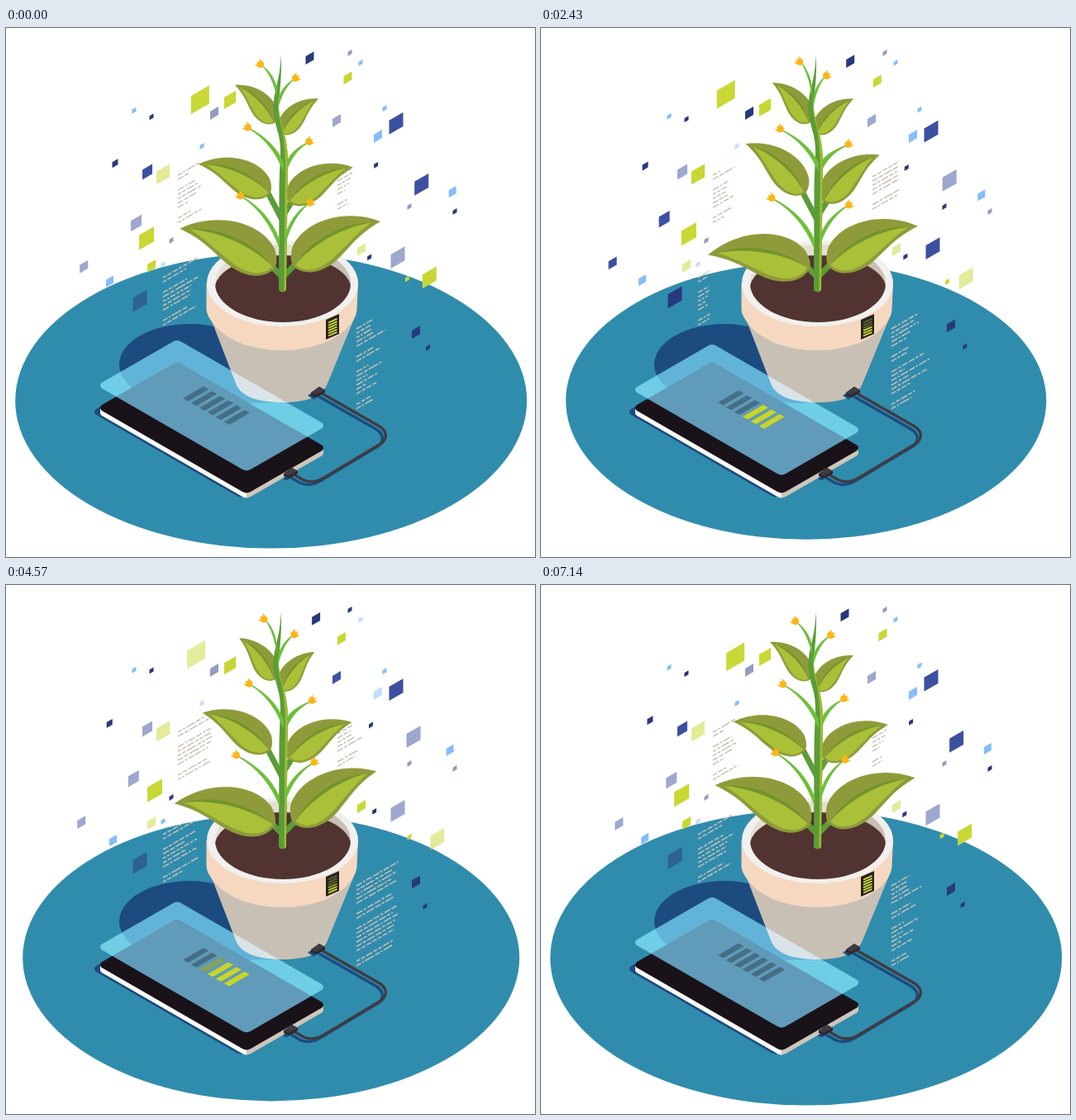
An HTML page with a canvas that plays this animation: 640 px wide and 640 px high, repeating every 7.21 s.

```html
<!DOCTYPE html>
<html lang="en">
<head>
<meta charset="utf-8">
<title>Plant power</title>
<style>
html, body { margin: 0; width: 100%; height: 100%; overflow: hidden; background: #fff; }
canvas { display: block; width: 100vw; height: 100vh; }
</style>
</head>
<body>
<canvas id="stage" width="640" height="640"></canvas>
<script>
const g = document.getElementById('stage').getContext('2d');
const LOOP = 7210;
const ISO = 0.577;
const TEAL = '#308cad', NAVY = '#1c4b80', INK = '#27397c', BLUE = '#3c50a0';
const SKY = '#84bdfb', LIME = '#c8d733', STONE = '#c9c0b5', GREEN = '#5b9c36';

// Sine wave over the loop that reaches 1 at the given time
const wave = (t, peak) => Math.cos((t - peak) / LOOP * Math.PI * 2);
const clamp = v => Math.max(0, Math.min(1, v));
const rad = deg => deg * Math.PI / 180;
const mix = (a, b, k) => a + (b - a) * k;

function fill(path, color) {
  g.fillStyle = color;
  g.fill(new Path2D(path));
}

function oval(x, y, rx, ry, color) {
  g.fillStyle = color;
  g.beginPath();
  g.ellipse(x, y, rx, ry, 0, 0, Math.PI * 2);
  g.fill();
}

function splitFill(x, left, right) {
  const s = g.createLinearGradient(x - 0.5, 0, x + 0.5, 0);
  s.addColorStop(0, left);
  s.addColorStop(1, right);
  return s;
}

function ground(t) {
  const u = clamp(t / 6210);
  const r = 309.5 - 22.5 * Math.abs(Math.sin(u * Math.PI)) ** 3;
  oval(320.7, 451, r, r * ISO, TEAL);
  oval(222, 407, 85, 49, NAVY);
  fill('M232 358 L300 380 L335 453 L225 455Z', NAVY);
}

// Three flashes take turns in each half loop; the fourth kind dips with the second
function flash(t, kind) {
  if (!kind) return 1;
  if (kind === 4) return 1.48 - flash(t, 2);
  const half = LOOP / 2;
  let d = Math.abs(t % half - (kind - 1) * half / 3);
  d = Math.min(d, half - d);
  return 0.5 + 0.5 * clamp(Math.cos(Math.PI * d / 1500) * 1.1);
}

// Still bits by kind of flash: colour, x, y, width
const still = [
  [],
  [[BLUE, 171, 174, 12], [LIME, 176, 288, 10], [SKY, 237, 143, 5], [INK, 543, 222, 5]],
  [[BLUE, 400, 112, 10], [LIME, 430, 268, 10], [SKY, 190, 286, 5], [INK, 200, 257, 5], [INK, 416, 30, 5]],
  [[INK, 252, 103, 10], [LIME, 190, 177, 16], [INK, 488, 216, 5]],
  [[SKY, 450, 131, 10], [SKY, 429, 42, 5]]
];

// Drifting bits share a peak time; wide ones may flash.
// Each has a colour, centre, width and one of six isometric ways
const drifts = [
  { peak: 3650, kind: 0, bits: [
    [LIME, 271, 93, 14, 1], [LIME, 176, 251, 18, 5], [LIME, 409, 63, 10, 2], [BLUE, 472, 122, 17, 1],
    [INK, 128, 166, 7, 2], [INK, 372, 39, 10, 0], [INK, 444, 168, 5, 2], [INK, 496, 363, 10, 4]] },
  { peak: 3650, kind: 1, bits: [[BLUE, 497, 186, 17, 3]] },
  { peak: 2750, kind: 4, bits: [[LIME, 230, 84, 22, 3], [SKY, 155, 103, 5, 1], [SKY, 537, 200, 9, 2], [LIME, 488, 305, 5, 0]] },
  { peak: 2700, kind: 3, bits: [[BLUE, 154, 234, 13, 3], [BLUE, 91, 287, 10, 3], [BLUE, 474, 273, 17, 4]] },
  { peak: 1650, kind: 3, bits: [[INK, 162, 331, 17, 4], [SKY, 126, 307, 9, 3], [INK, 176, 107, 5, 1], [INK, 510, 387, 5, 5]] },
  { peak: 4600, kind: 1, bits: [[LIME, 516, 304, 17, 0], [SKY, 458, 100, 5, 1], [INK, 442, 276, 5, 5]] }
];

function bit(color, x, y, w, alpha) {
  const k = w * ISO / 2, h = w / 2;
  g.globalAlpha = alpha;
  g.fillStyle = color;
  g.beginPath();
  g.moveTo(x - h, y - h + k);
  g.lineTo(x + h, y - h - k);
  g.lineTo(x + h, y + h - k);
  g.lineTo(x - h, y + h + k);
  g.fill();
  g.globalAlpha = 1;
}

function drawBits(t) {
  still.forEach((list, kind) => {
    for (const b of list) bit(...b, flash(t, kind));
  });
  for (const { peak, kind, bits } of drifts) {
    for (const [color, x, y, w, way] of bits) {
      const s = (3.2 + w / 5) * wave(t, peak), a = rad(30 + way * 60);
      bit(color, x + s * Math.cos(a), y + s * Math.sin(a), w, flash(t, w > 9 ? kind : 0));
    }
  }
}

// Slanted rows of code: corner, full length, peak time, rows in each paragraph
function drawCode(t) {
  let seed = 7;
  const rnd = () => (seed = (seed * 16807) % 2147483647) / 2147483647;
  g.strokeStyle = '#c9c0b4';
  g.lineWidth = 1.5;
  const block = (x, y, full, peak, ...runs) => {
    for (const run of runs) {
      for (let i = 0; i < run; i++, y += 5.3) {
        const most = full * (0.8 + 0.2 * rnd());
        const len = most * clamp(0.75 + 0.5 * wave(t, peak + 1800 * (rnd() - 0.5)));
        g.setLineDash([4 + 5 * rnd(), 1.8, 2 + 4 * rnd(), 1.8, 6 + 8 * rnd(), 1.8]);
        g.beginPath();
        g.moveTo(x, y);
        g.lineTo(x + len, y - len * ISO);
        g.stroke();
      }
      y += 7.5;
    }
  };
  block(208, 178, 42, 4700, 2, 5, 2);
  block(401, 180, 36, 2500, 5, 2);
  block(190, 302, 43, 6000, 2, 5, 2);
  block(424, 364, 51, 4400, 5, 2, 6, 2);
  g.setLineDash([]);
}

// Charge of each step, moving from the pot to the phone and back
const charge = (t, i) => i > 3 ? 0 :
  clamp((t - 390 - 720 * i) / 200 + 0.5) * clamp((6610 - 680 * i - t) / 200 + 0.5);

function pot(t) {
  fill('M248 352 L278 430 C284 447 308 453 335 453 C361 453 383 447 389 430 L421 352Z', STONE);
  fill('M242.5 309 V340 C243 347 246 351 250 357 C266 378 298 390 334 390 C370 390 402 378 418 357 C422 351 424 347 424.5 340 L426 309Z', '#f6d8c0');
  oval(334.5, 309, 91.5, 52, '#f1f0ee');
  g.save();
  g.beginPath();
  g.ellipse(335, 309, 82, 47, 0, 0, Math.PI * 2);
  g.clip();
  g.fillStyle = splitFill(348, '#e4dfd2', '#c9c0b4');
  g.fillRect(250, 260, 170, 100);
  oval(335, 316, 82.5, 41, '#513331');
  g.restore();

  fill('M387 353 L403 346 V370 L387 377Z', '#262120');
  g.lineWidth = 1.8;
  for (let i = 0; i < 6; i++) {
    const y = 356.5 + i * 3.2;
    g.beginPath();
    g.moveTo(390, y);
    g.lineTo(400.5, y - 4.6);
    g.strokeStyle = '#626a30';
    g.stroke();
    g.globalAlpha = 1 - charge(t, i);
    g.strokeStyle = LIME;
    g.stroke();
    g.globalAlpha = 1;
  }
}

// One leaf of unit length along x, with its inner face cut at a given rib height
const BLADE = 'M1 0 C.74 .29 .3 .36 .08 .17 C.02 .1 -.01 .03 .01 -.02 C.08 -.17 .28 -.2 .47 -.135 C.66 -.07 .75 -.015 1 0Z';
const face = rib => `M.91 .03 C.66 ${rib} .3 ${rib} .03 0 C.08 -.14 .26 -.16 .42 -.11 C.6 -.06 .72 0 .91 .03Z`;

function leaf(t, side, x, y, size, tilt, sway, peak) {
  g.save();
  g.translate(x, y);
  g.scale(side * size, -size);
  g.rotate(rad(tilt + sway * wave(t, peak)));
  fill(BLADE, '#8f9b3a');
  fill(face(0.16), '#71942c');
  fill(face(0.115), '#aac038');
  g.restore();
}

function flower(t, side, bx, by, fx, fy, peak) {
  const s = 3 * wave(t, peak), x = fx + side * s, y = fy + 0.6 * s;
  const a = rad(side * 55);
  const ex = x - 3 * Math.sin(a), ey = y + 3 * Math.cos(a);
  const cx = mix(bx, ex, 0.33), cy = mix(by, ey, 0.67);
  g.fillStyle = '#6ebf3a';
  g.beginPath();
  g.moveTo(bx, by);
  g.quadraticCurveTo(cx, cy, ex, ey + 0.8);
  g.lineTo(ex, ey - 0.8);
  g.quadraticCurveTo(cx - side * 2.5, cy - 2.5, bx, by - 12);
  g.fill();
  g.save();
  g.translate(x, y);
  g.rotate(a);
  fill('M-4.3 0 C-4.5 6 4.5 6 4.3 0 L4.8 -5 L2 -2.4 L0 -5.5 L-2 -2.4 L-4.8 -5Z', '#fdb515');
  g.restore();
}

function plant(t) {
  g.strokeStyle = GREEN;
  g.lineWidth = 7;
  g.stroke(new Path2D('M335 302 L316 283 M336 300 L350 286 M335 234 L313 192 M336 226 L349 205'));

  leaf(t, -1, 326, 290, 125, 14.3, -8.7, 3110);
  leaf(t, 1, 347, 288, 119, 27.7, -4.9, 1650);
  leaf(t, -1, 320, 200, 94, 29.4, 10.5, 2700);
  leaf(t, 1, 341, 210, 89, 31.8, 7.6, 2430);
  leaf(t, -1, 325, 115, 66.5, 46.8, 3.3, 4100);
  leaf(t, 1, 333, 128, 62, 45.3, -4.2, 1250);

  const right = 'C330 112 341 130 341 160 C340.5 220 339.5 270 339 317';
  fill(`M330 317 L330.5 200 C331 160 334 150 330 130 C325 112 322 100 324 88 C326 70 332 60 332.5 32 C334.5 60 330 80 330 95 ${right} Q334.5 322 330 317Z`, GREEN);
  fill(`M336.5 319 L337.5 200 C338.5 165 338 140 333 118 C330 108 328.5 100 329 88 L330 95 ${right}Z`, '#9fbb34');

  flower(t, -1, 331, 268, 280.5, 204.5, 3600);
  flower(t, 1, 338, 262, 371, 213, 3600);
  flower(t, -1, 336, 175, 292, 120.4, 1950);
  flower(t, 1, 340, 172, 369.5, 139, 3110);
  flower(t, -1, 328, 85, 310.5, 42, 6900);
  flower(t, 1, 329, 98, 348.5, 59.4, 6200);
}

// Flat tilted slab with rounded corners
function slab(dx, dy) {
  const p = [[207, 376.5, 10], [388, 481, 4], [291, 537, 10], [110, 432.5, 4]];
  g.beginPath();
  g.moveTo(297 + dx, 428.5 + dy);
  for (let i = 1; i <= 4; i++) {
    const [x, y, r] = p[i % 4], [nx, ny] = p[(i + 1) % 4];
    g.arcTo(x + dx, y + dy, nx + dx, ny + dy, r);
  }
  g.closePath();
  g.fill();
}

function cable() {
  const wire = new Path2D('M382 442 L452 482 Q465 491 455 502 L385 544 Q372 552 360 547 L348 540');
  g.lineWidth = 3.4;
  g.save();
  g.translate(-4, 3.5);
  g.strokeStyle = NAVY;
  g.stroke(wire);
  fill('M369 441 L379 435 L386 439 L376 446Z M336 540 L346 534 L353 538 L343 544Z', NAVY);
  g.restore();
  g.strokeStyle = '#403b40';
  g.stroke(wire);
}

function plug(x, y) {
  g.save();
  g.translate(x, y);
  fill('M-8 1 L2 -6 L9 -2 V1 L-2 7 L-8 4Z', '#2b272b');
  fill('M-8 1 L2 -6 L9 -2 L-2 4Z', '#403b40');
  g.restore();
}

function phone(t) {
  g.fillStyle = NAVY;
  slab(-7, 32);
  cable();
  g.fillStyle = splitFill(291, '#fbfaf8', '#cfc6ba');
  for (let d = 33; d > 27; d--) slab(0, d);
  g.fillStyle = '#1a1219';
  slab(0, 27);
  plug(377, 440);
  plug(344, 538);

  const lift = 3.35 - 3.35 * wave(t, 0);
  g.globalCompositeOperation = 'screen';
  g.fillStyle = 'rgb(78,147,177)';
  slab(0, lift);
  g.globalCompositeOperation = 'source-over';

  const bar = 'M214 448 L239 433.5 L245.5 437 L220.5 451.5Z';
  for (let i = 0; i < 6; i++) {
    g.save();
    g.translate(9.9 * i, 5.7 * i + lift);
    fill(bar, '#456f87');
    g.globalAlpha = charge(t, 5 - i);
    fill(bar, '#c6d62f');
    g.restore();
  }
}

const start = performance.now();

function frame() {
  const t = (performance.now() - start) % LOOP;
  g.fillStyle = '#fff';
  g.fillRect(0, 0, 640, 640);
  ground(t);
  drawBits(t);
  drawCode(t);
  pot(t);
  plant(t);
  phone(t);
  requestAnimationFrame(frame);
}

frame();
</script>
</body>
</html>
```
